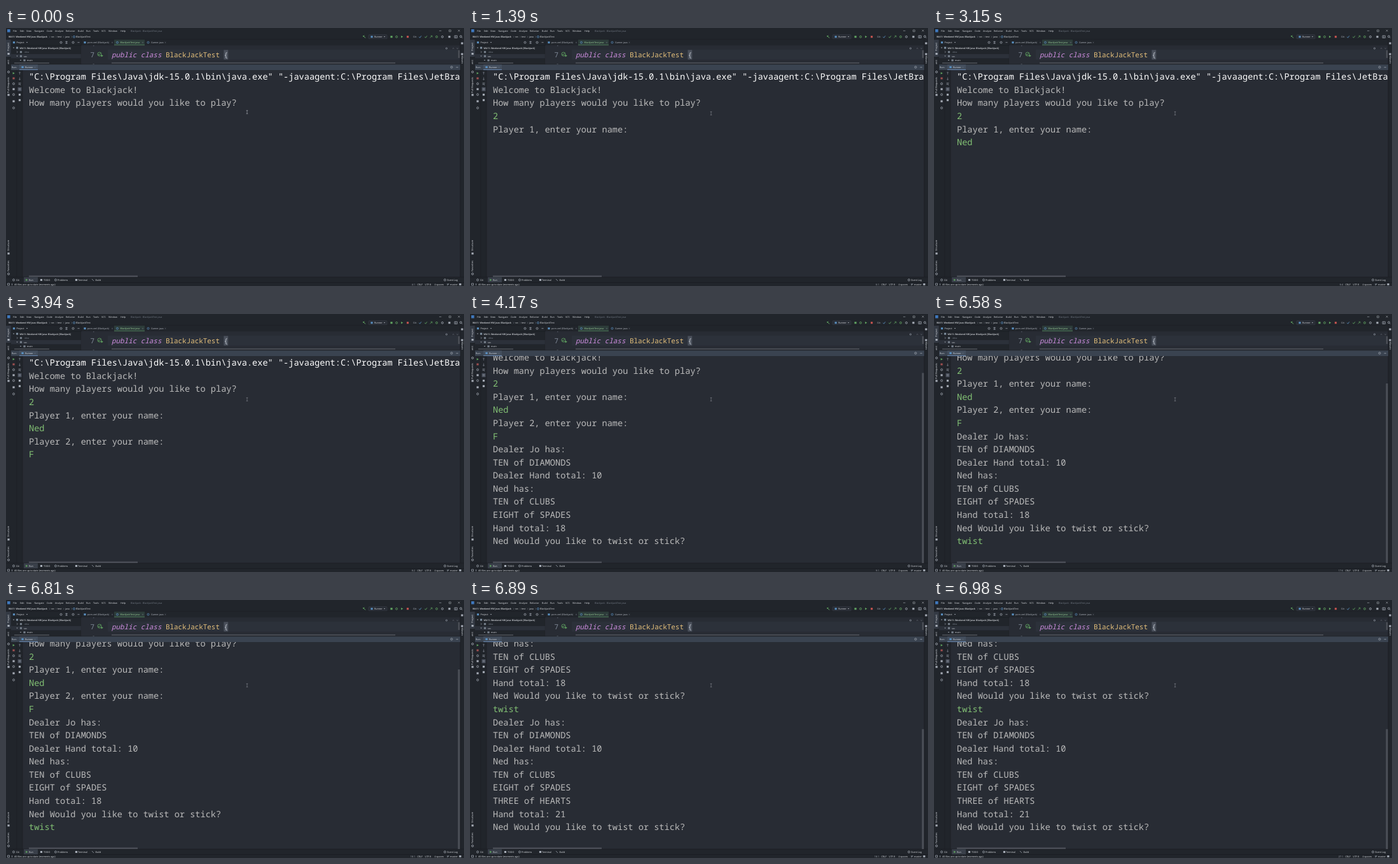
Write an HTML page that moves like this. It is 720x405 px and loops after 8000 ms.

```html
<!DOCTYPE html>
<html lang="en">
<head>
<meta charset="utf-8">
<title>Blackjack console</title>
<style>
html, body { margin: 0; width: 100%; height: 100%; overflow: hidden; background: #282c34; }
svg { display: block; width: 100vw; height: 100vh; }
text { font: 3.7px "Open Sans", "Noto Sans", sans-serif; fill: #b4b9c2; text-rendering: geometricPrecision; }
.side { font-size: 4px; fill: #d4d8de; }
.code { font: 10.9px "Noto Sans Mono", "DejaVu Sans Mono", monospace; }
.out text { font: 13.62px "Noto Sans Mono", "DejaVu Sans Mono", monospace; fill: #bbb; }
.out .cmd { fill: #fff; }
.out .in { fill: #82c074; }
</style>
</head>
<body>
<svg viewBox="0 0 720 405">
  <defs><clipPath id="view"><rect x="26" y="66" width="688" height="325"/></clipPath></defs>
  <g id="ide"></g>
  <g clip-path="url(#view)"><g id="out" class="out"></g></g>
  <rect id="caret" width="1" height="17" fill="#c5c8cc"/>
  <rect id="thumb" x="710.5" width="3" fill="#4c5058"/>
  <rect x="36" y="388.6" width="171" height="2.2" fill="#4e525a"/>
  <text id="pos" x="643" y="403.6" text-anchor="end"></text>
  <path id="mouse" d="M-1.3-2.6H1.3M0-2.6V2.6M-1.3 2.6H1.3" fill="none" stroke="#b4b8be" stroke-width=".6"/>
</svg>
<script>
const LOOP = 8000, PITCH = 20.58, CHAR = 8.17, LEFT = 36, BASE = 81.2;
const $ = id => document.getElementById(id);

const rect = (x, y, w, h, fill) => `<rect x="${x}" y="${y}" width="${w}" height="${h}" fill="${fill}"/>`;
const text = (x, y, s, attr = '') => `<text x="${x}" y="${y}" ${attr}>${s}</text>`;
const row = (y, items, attr) => items.map(([x, s]) => text(x, y, s, attr)).join('');
const side = (x, y, s, turn = -90) => text(0, 0, s, `class="side" transform="translate(${x} ${y}) rotate(${turn})"`);
const line = (d, color = '#a8aeb8', w = .7) => `<path d="${d}" fill="none" stroke="${color}" stroke-width="${w}"/>`;
const ring = (x, y, color = '#a8aeb8', r = 1.5) => `<circle cx="${x}" cy="${y}" r="${r}" fill="none" stroke="${color}" stroke-width=".8"/>`;
const play = (x, y, color = '#62a762') => `<path d="M${x - 1.4} ${y - 1.8}l3.2 1.8-3.2 1.8z" fill="${color}"/>`;
const box = (x, y, color = '#a8aeb8') => rect(x - 1.6, y - 1.5, 3.2, 3, color);
const check = (x, y, color) => line(`M${x - 1.7} ${y}l1.3 1.5 2.3-3`, color, .9);
const cross = (x, y) => line(`M${x - .8} ${y - .8}l1.6 1.6m0-1.6l-1.6 1.6`, '#747b86', .5);
const down = (x, y) => `<path d="M${x - 1.2} ${y - .7}h2.4l-1.2 1.5z" fill="#a8aeb8"/>`;

const DARK = '#21252b', GREEN = '#62a762', BLUE = '#5a8fc0', DIM = 'fill="#747b86"', LIGHT = 'style="fill:#dcdfe4"';
const BOLD = 'font-weight="600" style="fill:#dcdfe4;font-weight:600;font-size:3.6px"';

function topBars() {
  return rect(0, 0, 720, 28, DARK) + rect(2, 2, 4.6, 4.6, '#3f78bd') +
    row(5.7, [[11, 'File'], [22, 'Edit'], [32, 'View'], [44.5, 'Navigate'], [64, 'Code'], [77, 'Analyze'],
      [94, 'Refactor'], [113, 'Build'], [126, 'Run'], [137, 'Tools'], [150, 'VCS'], [161, 'Window'], [180, 'Help']], LIGHT) +
    text(196, 5.7, 'Blackjack - BlackJackTest.java', 'style="fill:#747b86"') +
    line('M681 4.4h3.4M710.6 2.8l2.8 2.8m0-2.8l-2.8 2.8', '#c3c8cf', .5) + line('M696.5 3h2.8v2.8h-2.8z', '#c3c8cf', .5) +
    text(4, 15.2, 'Wk11: Weekend HW Java: Blackjack', BOLD) +
    row(15.2, [[71, 'src'], [81, 'test'], [93, 'java'], [110, 'BlackJackTest']], LIGHT) +
    line('M68.2 12.6l1 1.2-1 1.2M78.4 12.6l1 1.2-1 1.2M90 12.6l1 1.2-1 1.2M102.6 12.6l1 1.2-1 1.2', '#747b86', .5) +
    ring(107, 13.8, BLUE) +
    line('M561 12l4.2 3.6M561.5 13.6l2-2', GREEN, 1) +
    `<rect x="570" y="10.6" width="29" height="6.4" rx="1" fill="#282c34" stroke="#3c424c" stroke-width=".5"/>` +
    box(575, 13.8, BLUE) + text(579, 15.2, 'Runner', LIGHT) + down(595, 13.8) +
    box(606, 13.8, GREEN) + ring(614, 13.8, GREEN) + play(622.5, 13.8) + box(631.5, 13.8, '#c75450') +
    text(640, 15.2, 'Git:') + check(651, 13.8, BLUE) + check(660, 13.8, GREEN) +
    line('M666.5 15.4l3.4-3.2m-2.3 0h2.3v2.3', GREEN) + ring(677, 13.8, GREEN) + ring(686, 13.8) + box(697, 13.8) +
    line('M705 12h4.4v3.6H705zM707 12v3.6') + ring(715, 13.3) + line('M716 14.4l1.4 1.4');
}

function projectPane() {
  return rect(0, 18, 8, 373, DARK) + rect(0, 18, 7.6, 27, '#343a44') +
    rect(8, 18, 110, 39, DARK) + rect(8, 41, 110, 6.4, '#2c313a') +
    line('M0 18h720M8 27.3h110M118.3 18v39', '#181a1f', .6) +
    box(12.5, 22.7, BLUE) + text(16.5, 24.1, 'Project', LIGHT) + down(33, 22.8) +
    ring(86.5, 22.7) + line('M93.4 21.4h3.4M93.4 24h3.4M95 20.6v4.2') + ring(105.5, 22.7) + line('M112.5 22.7h3') +
    down(12, 31.2) + box(17.5, 31.1, '#8090a0') +
    text(21.5, 32.5, 'Wk11: Weekend HW Java: Blackjack [BlackJack]', BOLD) +
    rect(118, 27.5, 12, 29, '#282c34') +
    line('M17 36.3l1.2 1.3-1.2 1.3') + box(23.5, 37.7, '#77808c') + text(28, 39, '.idea', 'style="fill:#747b86"') +
    down(17.5, 44.3) + box(23.5, 44.2, '#77808c') + text(28, 45.6, 'src', LIGHT) +
    down(23, 50.8) + box(29, 50.8, '#77808c') + text(33, 52.2, 'main', LIGHT) +
    rect(13, 54.2, 55, 1.6, '#4c5058') +
    side(5.2, 36, 'Project') + box(4, 40.5) + side(5.2, 65, 'Commit') + ring(4, 69) +
    side(5.2, 102, 'Pull Requests') + box(4, 105) +
    side(5.2, 350, 'Structure') + box(4, 354) + side(5.2, 382, 'Favorites') + ring(4, 386);
}

function editor() {
  return rect(118.6, 18.3, 595.4, 9, DARK) + rect(170, 18.3, 48, 9, '#2d3c3a') + rect(170, 26.5, 48, .9, '#5f9a68') +
    box(124, 22.7, BLUE) + text(128, 24.1, 'pom.xml (Blackjack)') + cross(167, 22.8) +
    ring(175, 22.7, BLUE) + text(179.5, 24.1, 'BlackJackTest.java', 'style="fill:#9fd09a"') + cross(215, 22.8) +
    ring(223.5, 22.7, BLUE) + text(228, 24.1, 'Gamer.java') + cross(250.5, 22.8) +
    rect(118.6, 27.3, 595.4, 29.7, '#282c34') + rect(160, 34, 554, 15.6, '#2c313a') +
    rect(342.4, 34.5, 6.8, 15, '#4a505b') +
    text(132.6, 46.2, '7', 'class="code" style="fill:#7f8896"') +
    rect(137, 27.5, 1.5, .8, '#6b7380') + rect(136.6, 56, 2, .8, '#6b7380') +
    ring(147, 41, GREEN, 3) + check(146.6, 41, GREEN) + play(151, 43.6) +
    `<text x="166" y="46.2" class="code"><tspan fill="#cf8ee0" font-style="italic">public class</tspan> ` +
    `<tspan fill="#e5c07b">BlackJackTest</tspan> <tspan fill="#c5cad3">{</tspan></text>` +
    rect(166, 54, 446, 1.7, '#4c5058') + ring(692.5, 32, '#8b929c', 1.2) +
    line('M702 32.5l1.2-1 1.2 1M708.4 31.5l1.2 1 1.2-1', '#8b929c', .5) + rect(710.8, 35, 2.6, 12, '#4c5058') +
    rect(714, 18, 6, 373, DARK) + line('M714 18v373', '#181a1f', .6) +
    box(717, 24) + box(717, 41) + side(715.8, 43.5, 'Maven', 90);
}

function runPane() {
  const tools = [[71, 'go'], [79, 'stop'], [87.5], [96], [104.5], [115], [125.5]];
  return rect(0, 57, 714, 9, '#3a4350') + rect(0, 57, 8, 9, DARK) + line('M8 57h706', '#181a1f', .5) +
    text(9, 62.8, 'Run:', LIGHT) + rect(21, 57.3, 29, 8.7, '#434e5d') + rect(21, 65.1, 29, .9, '#6a8cb8') +
    box(26, 61.5, BLUE) + text(30, 62.8, 'Runner', LIGHT) + cross(45.5, 61.6) +
    ring(700.5, 61.5) + line('M707.5 61.7h3.4') +
    rect(8, 66, 18, 325, DARK) + line('M17 66v325M26 66v325', '#1b1e23', .6) +
    tools.map(([y, kind], i) => kind === 'go' ? play(12, y) : kind === 'stop' ? box(12, y, '#a05050') :
      i % 2 ? box(12, y) : ring(12, y)).join('') +
    line('M21.5 69v4m-1.3-2.7l1.3-1.4 1.3 1.4M21.5 77.5v4m-1.3-1.3l1.3 1.4 1.3-1.4', '#7b828d') +
    line('M19.6 86.5h3.8M19.6 88.5h3v1.2') + rect(18.4, 93, 6.2, 6.2, '#404652') +
    line('M19.6 95h3.8M19.6 97h3.8') + box(21.5, 104.7) + box(21.5, 113.2);
}

function bottomBars() {
  return rect(0, 391, 720, 14, DARK) + line('M0 391h720M0 399.6h720', '#181a1f', .6) + rect(28, 391.3, 22, 8, '#3a404a') +
    ring(12, 395.5) + play(32.5, 395.5) + box(55.5, 395.5) + ring(78, 395.5) + box(110.5, 395.5) + line('M135 394l3 3') +
    row(396.9, [[16, 'Git'], [36, 'Run'], [59, 'TODO'], [81, 'Problems'], [113, 'Terminal'], [140.5, 'Build'], [693.5, 'Event Log']], LIGHT) +
    ring(690, 395.5) + line('M2.5 400.8h3v3h-3z') + line('M9.5 401v3') +
    text(13, 403.6, 'All files are up-to-date (moments ago)', LIGHT) +
    row(403.6, [[646.5, 'CRLF'], [658.5, 'UTF-8'], [673.5, '4 spaces'], [698, 'master']], LIGHT) +
    line('M694 401v3M695.8 401v1.4l-1.8.8') + box(714, 402.4);
}

$('ide').innerHTML = topBars() + projectPane() + editor() + runPane() + bottomBars();

// A leading ">" marks typed input
const deal = ['Dealer Jo has:', 'TEN of DIAMONDS', 'Dealer Hand total: 10', 'Ned has:', 'TEN of CLUBS', 'EIGHT of SPADES'];
const ask = 'Ned Would you like to twist or stick?';
const log = [
  String.raw`"C:\Program Files\Java\jdk-15.0.1\bin\java.exe" "-javaagent:C:\Program Files\JetBra`,
  'Welcome to Blackjack!', 'How many players would you like to play?', '>2',
  'Player 1, enter your name:', '>Ned', 'Player 2, enter your name:', '>F',
  ...deal, 'Hand total: 18', ask, '>twist', ...deal, 'THREE of HEARTS', 'Hand total: 21', ask
];

// [time, finished lines, typed characters of the next line]
const steps = [
  [0, 3, 0], [680, 3, 1], [1070, 4, 0], [1300, 5, 0],
  [2160, 5, 1], [2310, 5, 2], [2460, 5, 3], [3090, 6, 0], [3320, 7, 0],
  [3550, 7, 1], [3870, 8, 0], [4100, 16, 0],
  [5650, 16, 1], [5960, 16, 2], [6280, 16, 4], [6350, 16, 5], [6580, 17, 0], [6890, 26, 0]
];

$('out').innerHTML = log.map((s, i) =>
  text(LEFT, BASE + i * PITCH, s.replace('>', ''), `class="${s[0] === '>' ? 'in' : i ? '' : 'cmd'}"`)).join('');
const rows = [...$('out').children];

const stepAt = t => steps.findLast(s => s[0] <= t) || steps[0];

function draw(now) {
  const t = now % LOOP;
  const [, done, typed] = stepAt(t);
  const scroll = Math.max(0, (done - 1) * PITCH - 280);
  rows.forEach((el, i) => {
    const full = log[i].replace('>', '');
    const s = i < done ? full : i === done ? full.slice(0, typed) : '';
    if (el.textContent !== s) el.textContent = s;
  });
  $('out').setAttribute('transform', `translate(0 ${-scroll})`);

  const caret = $('caret');
  caret.setAttribute('visibility', typed ? 'visible' : 'hidden');
  caret.setAttribute('x', LEFT - .8 + typed * CHAR);
  caret.setAttribute('y', BASE - 13.4 + done * PITCH - scroll);

  const top = 66 + 325 * scroll / (323 + scroll);
  $('thumb').setAttribute('y', top);
  $('thumb').setAttribute('height', scroll ? 391 - top : 0);

  // The position readout trails the console slightly
  const [, ln, col] = stepAt(t - 80);
  $('pos').textContent = `${ln + 1}:${col + 1}`;

  const moved = t >= 140;
  $('mouse').setAttribute('transform', `translate(379 ${moved ? 134 : 132})`);
  $('mouse').setAttribute('opacity', moved ? .7 : 1);
}

const start = performance.now();
function frame() {
  draw(performance.now() - start);
  requestAnimationFrame(frame);
}
frame();
</script>
</body>
</html>
```
